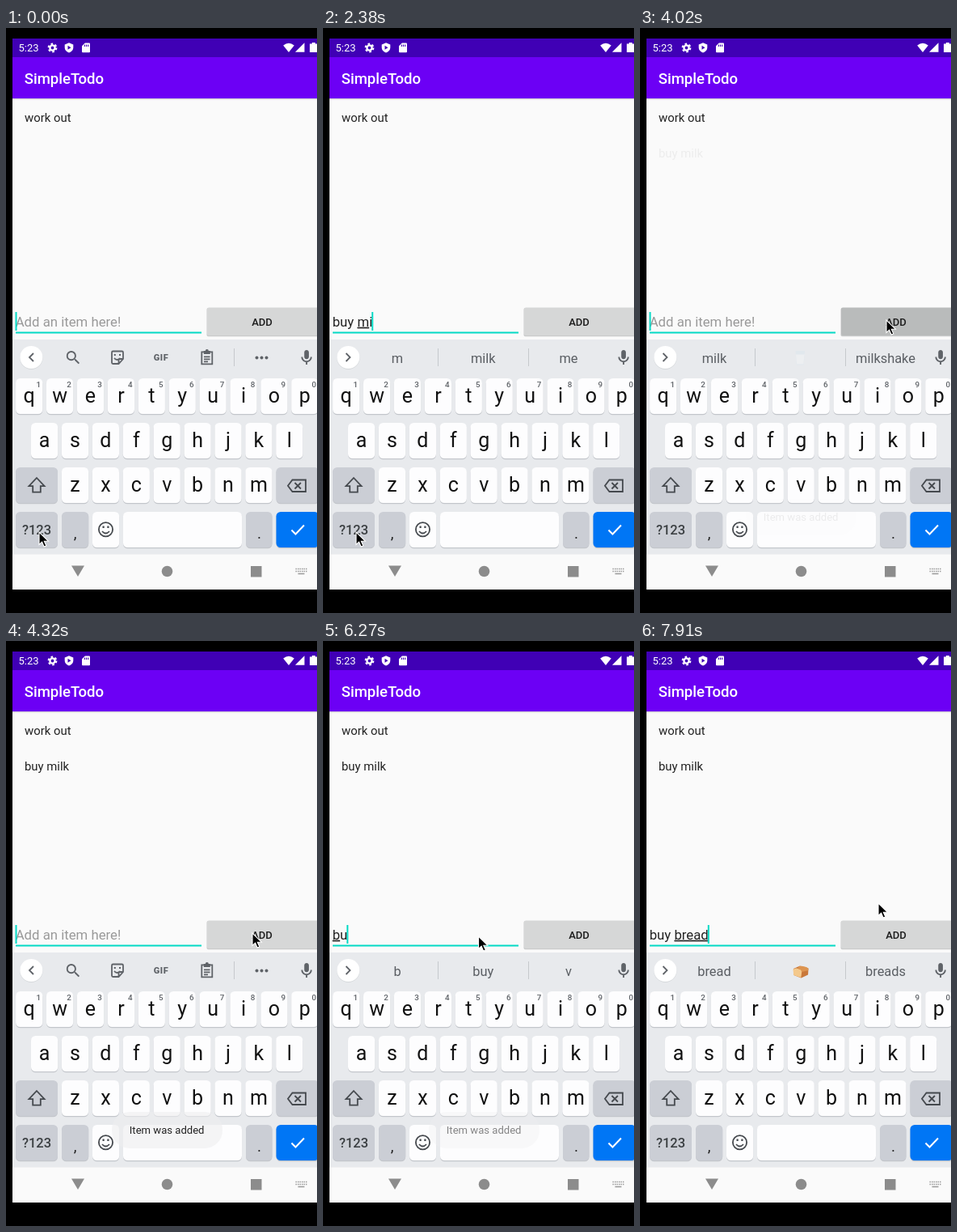
An HTML page for the animation above (8 s loop, 385 by 723 pixels).

```html
<!DOCTYPE html>
<html lang="en">
<head>
<meta charset="utf-8">
<title>Todo list</title>
<style>
  html, body { margin: 0; width: 100%; height: 100%; overflow: hidden; background: #000; }
  svg { display: block; width: 385px; height: 723px; font-family: Roboto, Arial, sans-serif; }
  text { white-space: pre; }
  .mid { text-anchor: middle; }
  .letter { font-size: 25px; fill: #111; }
  .digit { font-size: 9.8px; font-weight: 500; fill: #5f6368; }
  .item { font-size: 14.9px; fill: #222; }
  .field { font-size: 16.75px; fill: #222; }
  .word { font-size: 16.4px; fill: #5a5e63; }
  .line { fill: none; stroke: #5f6368; stroke-width: 1.8; }
  .dark { fill: none; stroke: #45494e; stroke-width: 1.8; }
  .grey { fill: #5f6368; }
  .split { stroke: #c6c9cd; stroke-width: 1; }
  .under { text-decoration: underline; text-decoration-thickness: 1px; }
</style>
</head>
<body>
<svg viewBox="0 0 385 723">
  <!-- app -->
  <rect x="8" y="13" width="377" height="681" fill="#fafafa"/>
  <rect x="8" y="87" width="377" height="1" fill="#d2d0d6"/>
  <rect x="8" y="88" width="377" height="1" fill="#ececee"/>
  <rect x="8" y="13" width="377" height="23" fill="#4000b5"/>
  <rect x="8" y="36" width="377" height="51" fill="#6c00f5"/>
  <g fill="#fff">
    <text x="15.5" y="29.3" font-size="13">5:23</text>
    <g fill="none" stroke="#fff">
      <circle cx="57.5" cy="24.5" r="3.1" stroke-width="2.4"/>
      <circle cx="57.5" cy="24.5" r="4.9" stroke-width="2" stroke-dasharray="2.6 2.53"/>
    </g>
    <path d="M78 18.3l5.3 2.2v3.6c0 3-2.200 5.600-5.300 6.500-3.100-.9-5.300-3.500-5.300-6.500v-3.600z"/>
    <path d="M76.500 21.800l4 2.500-4 2.500z" fill="#4000b5"/>
    <path d="M97.800 18.500h5.200q1 0 1 1v9.800q0 1-1 1h-8q-1 0-1-1v-7z"/>
    <path d="M97.300 20.500v2.500M99.500 20.500v2.500M101.700 20.500v2.500" stroke="#4000b5" stroke-width="1.100"/>
    <path d="M350 30l-6.800-8.600q6.800-5.300 13.600 0z"/>
    <path d="M369.500 18.300v11.500h-11.500z"/>
    <path d="M376 19.500h2.800v-1.500h4v1.500h3v10.500h-9.800z"/>
    <text x="22.700" y="68.500" font-size="18.600" font-weight="500">SimpleTodo</text>
  </g>
  <text class="item" x="23" y="115.500">work out</text>
  <text class="item" id="added" x="23" y="160.300">buy milk</text>

  <!-- entry row -->
  <rect x="12" y="375.500" width="230" height="2" fill="#03dac5"/>
  <text class="field" x="11.700" y="368.700" id="hint" style="fill:#999">Add an item here!</text>
  <text class="field" x="11.700" y="368.700" id="entry"><tspan></tspan><tspan class="under"></tspan><tspan></tspan></text>
  <rect id="caret" y="351" width="2" height="23" fill="#03dac5"/>
  <rect x="248.500" y="346" width="140" height="35.300" rx="2" fill="#c9cacb"/>
  <rect id="add" x="249" y="345.500" width="140" height="34.500" rx="2"/>
  <text class="mid" x="317" y="367.500" font-size="13" font-weight="500" fill="#1c1c1c">ADD</text>

  <!-- keyboard -->
  <rect x="8" y="385" width="377" height="265" fill="#e8eaed"/>
  <circle cx="31.300" cy="407.800" r="14.200" fill="#d6d9dc"/>
  <circle cx="31.300" cy="407" r="14" fill="#fff"/>
  <path id="chevron" class="line"/>

  <g id="tools">
    <path class="grey" transform="translate(72 396.300) scale(.93)" d="M15.500 14h-.79l-.28-.27A6.470 6.470 0 0 0 16 9.500 6.500 6.500 0 1 0 9.500 16c1.610 0 3.090-.59 4.230-1.570l.27.28v.79l5 4.990L20.490 19l-4.990-5zm-6 0C7.010 14 5 11.990 5 9.500S7.010 5 9.500 5 14 7.010 14 9.500 11.990 14 9.500 14z"/>
    <path class="line" d="M132.500 399.500h11q1.500 0 1.500 1.500v8l-5.500 6h-7q-1.500 0-1.500-1.500v-12.500q0-1.500 1.500-1.500zM145 409h-4q-1.500 0-1.500 1.500v4.500M134 408q3.500 4 7 0"/>
    <path class="grey" d="M133.800 403h2v2h-2zM140 403h2v2h-2z"/>
    <text class="mid grey" x="192" y="410.800" font-size="11" font-weight="900" letter-spacing=".6">GIF</text>
    <path class="line" d="M242.300 400.300h13v15h-13z"/>
    <path class="grey" d="M244.800 399h2a2 2 0 0 1 4 0h2v4h-8z"/>
    <path class="line" stroke-width="1.400" d="M245 406.300h7.500M245 409.300h7.500M245 412.300h5"/>
    <path class="split" d="M282.500 396v22"/>
    <g class="grey"><circle cx="310.500" cy="407.500" r="2"/><circle cx="316.500" cy="407.500" r="2"/><circle cx="322.500" cy="407.500" r="2"/></g>
  </g>

  <g id="words">
    <path class="split" d="M142.500 396v22M254.500 396v22"/>
    <text class="word mid" x="92" y="413.500"></text>
    <text class="word mid" x="198.300" y="413.500"></text>
    <text class="word mid" x="304" y="413.500"></text>
  </g>
  <g id="milk">
    <path d="M192.500 399h11.500l-1.300 17.500h-8.900z" fill="#cfe3ee"/>
    <path d="M193 403.500h10.500l-1.200 12h-8.100z" fill="#fff"/>
  </g>
  <g id="bread">
    <path d="M190 405l8-3.500 10.500 3-.5 8-8.500 4-9-3.500z" fill="#c9783a"/>
    <path d="M189.500 406q4-2.500 7.500-.5 3.500.500 3.300 3.200l-1 7.300-9-3z" fill="#f4c98c"/>
    <path d="M196 402.500q4.500-2 10.500.8 2.800 1.700 1.500 4l-8 1.700q0-3-4-3.800z" fill="#dd9450"/>
  </g>
  <path class="grey" transform="translate(360.700 396) scale(.95)" d="M12 14c1.660 0 3-1.340 3-3V5c0-1.660-1.340-3-3-3S9 3.340 9 5v6c0 1.660 1.340 3 3 3zm5-3c0 2.760-2.240 5-5 5s-5-2.240-5-5H5c0 3.530 2.610 6.430 6 6.920V21h2v-3.080c3.390-.49 6-3.390 6-6.920h-2z"/>

  <g id="keys"></g>
  <path class="dark" d="M38 556l9.600 10.200h-4.800v7.500h-9.600v-7.500h-4.800z"/>
  <path class="dark" d="M354.500 558.500h16.500v14.500h-16.500l-5.500-7.250zM357.500 562l7.500 7.500M365 562l-7.500 7.500"/>
  <text class="mid" x="38" y="626" font-size="16.500" fill="#3c4043" font-weight="500">?123</text>
  <text class="mid" x="85.700" y="631" font-size="19" fill="#222">,</text>
  <text class="mid" x="313.500" y="631" font-size="19" fill="#222">.</text>
  <circle class="dark" cx="123.500" cy="619.700" r="8.600"/>
  <path class="dark" d="M119 622q4.500 5 9 0"/>
  <path d="M119.500 615.500h2.200v2.500h-2.200zM125.300 615.500h2.200v2.500h-2.200z" fill="#45494e"/>
  <path d="M353.500 620.500l5 5 10.500-11" fill="none" stroke="#fff" stroke-width="2"/>

  <!-- toast -->
  <g id="toast">
    <rect x="131" y="582" width="137" height="45" rx="22" fill="#efeff1" opacity=".6"/>
    <text x="152.800" y="609" font-size="13.100" fill="#222">Item was added</text>
  </g>

  <!-- navigation -->
  <g fill="#8c8c8c">
    <path d="M81 664.500h16l-8 13.500z"/>
    <circle cx="199.500" cy="671.500" r="6.800"/>
    <rect x="303" y="665" width="13.500" height="13.500"/>
    <path d="M358.500 668.500h14M358.500 671.500h14" stroke="#999" stroke-width="1.600" stroke-dasharray="1.500 1"/>
    <path d="M361.500 674.500h8" stroke="#999" stroke-width="1.500"/>
  </g>
  <rect x="8" y="650" width="377" height="1" fill="#f1f1f2"/>

  <path id="pointer" d="M0 0v15.500l3.600-3.300 2.500 5.800 2.700-1.100-2.500-5.700h5z" fill="#000" stroke="#fff" stroke-width="1.100"/>
</svg>
<script>
  const LOOP = 8000;
  const $ = id => document.getElementById(id);

  // Key caps
  const PITCH = 37.9;
  const caps = [];
  const cap = (x, y, w, fill = '#fdfdfe') => caps.push(
    `<rect x="${x}" y="${y + 1}" width="${w}" height="44.3" rx="5.5" fill="#c3c6cb"/>` +
    `<rect x="${x}" y="${y}" width="${w}" height="44" rx="5.5" fill="${fill}"/>`);
  [['qwertyuiop', 28.7, 433], ['asdfghjkl', 47.6, 488], ['zxcvbnm', 85.5, 543]].forEach(([row, left, y]) => {
    [...row].forEach((ch, i) => {
      const x = left + i * PITCH;
      cap(x - 16.6, y, 33.2);
      caps.push(`<text class="letter mid" x="${x}" y="${y + 30.3}">${ch}</text>`);
      if (y === 433) caps.push(`<text class="digit mid" x="${x + 11.5}" y="444">${(i + 1) % 10}</text>`);
    });
  });
  const SHADE = '#cbced5';
  cap(12, 543, 52, SHADE);
  cap(334.5, 543, 53, SHADE);
  cap(12, 598, 52, SHADE);
  cap(69, 598, 33.2, SHADE);
  cap(107, 598, 33.2);
  cap(145, 598, 147);
  cap(297, 598, 32.5, SHADE);
  cap(334.5, 598, 53, '#0076f5');
  $('keys').innerHTML = caps.join('');

  // Step tracks: [start, value]; composing letters sit between bars
  const typed = [
    [0, ''], [1190, 'b'], [1480, '|b|'], [1630, '|b|u'], [1780, '|bu|y'], [1930, '|buy|'],
    [2080, 'buy '], [2230, 'buy m'], [2380, 'buy |m|i'], [2680, 'buy |mil|'], [2980, 'buy |milk|'],
    [4020, ''], [5970, 'b'], [6120, '|b|'], [6270, '|b|u'], [6410, '|bu|y'], [6560, '|buy|'],
    [6710, 'buy '], [6860, 'buy b'], [7160, 'buy |b|'], [7310, 'buy |br|'], [7610, 'buy |brea|'],
    [7760, 'buy |bread|']
  ];
  const hints = [
    [0, ''], [1480, 'b buy v'], [1780, 'bu buy but'], [1930, 'buy but buying'], [2080, 'a the it'],
    [2380, 'm milk me'], [2680, 'mil milk miles'], [3130, 'milk * milkshake'], [4170, ''],
    [6120, 'b buy v'], [6410, 'bu buy but'], [6560, 'buy but buying'], [6710, 'a the it'],
    [7160, 'b bread be'], [7310, 'br bread be'], [7610, 'bread * breads']
  ];
  const caret = [[0, 1], [450, 0], [890, 1], [4470, 0], [4920, 1], [5520, 0], [5970, 1]];
  const pointer = [
    [0, [41, 623]], [3280, [95, 575]], [3430, [200, 470]], [3580, [282, 385]], [3730, [305, 361]],
    [4770, [265, 363]], [4920, [212, 365]], [5070, [192.5, 365]],
    [7610, [222, 353]], [7760, [268, 336]], [7910, [295, 324]]
  ];
  const button = [[0, '#d6d7d7'], [3870, '#b9bbbb'], [4320, '#d6d7d7']];
  const added = [[0, 0], [4020, .06], [4170, .6], [4320, 1]];
  const toast = [[0, 0], [4020, .08], [4170, .6], [4320, 1], [6120, .8], [6270, .55], [6410, .25], [6560, 0]];
  const milkFade = [[0, 1], [4020, .25]];

  const at = (track, t) => {
    let value;
    for (const [start, v] of track) if (start <= t) value = v;
    return value;
  };
  const show = (id, on) => $(id).setAttribute('opacity', Number(on));

  const spans = document.querySelectorAll('#entry tspan');
  const words = document.querySelectorAll('#words text');

  function draw(t) {
    const parts = at(typed, t).split('|');
    spans.forEach((span, i) => span.textContent = parts[i] || '');
    const text = parts.join('');
    show('hint', !text);
    $('caret').setAttribute('x', text ? 10.7 + $('entry').getComputedTextLength() : 11.5);
    show('caret', at(caret, t));

    const offer = at(hints, t);
    const list = offer.split(' ');
    words.forEach((word, i) => word.textContent = list[i] && list[i] !== '*' ? list[i] : '');
    show('words', offer);
    show('tools', !offer);
    show('milk', list[0] === 'milk' && at(milkFade, t));
    show('bread', list[0] === 'bread');
    $('chevron').setAttribute('d', offer ? 'M28.5 402l5 5-5 5' : 'M34 402l-5 5 5 5');

    $('add').setAttribute('fill', at(button, t));
    show('added', at(added, t));
    show('toast', at(toast, t));
    $('pointer').setAttribute('transform', `translate(${at(pointer, t)})`);
  }

  const begin = performance.now();
  function tick() {
    draw((performance.now() - begin) % LOOP);
    requestAnimationFrame(tick);
  }
  tick();
</script>
</body>
</html>
```
